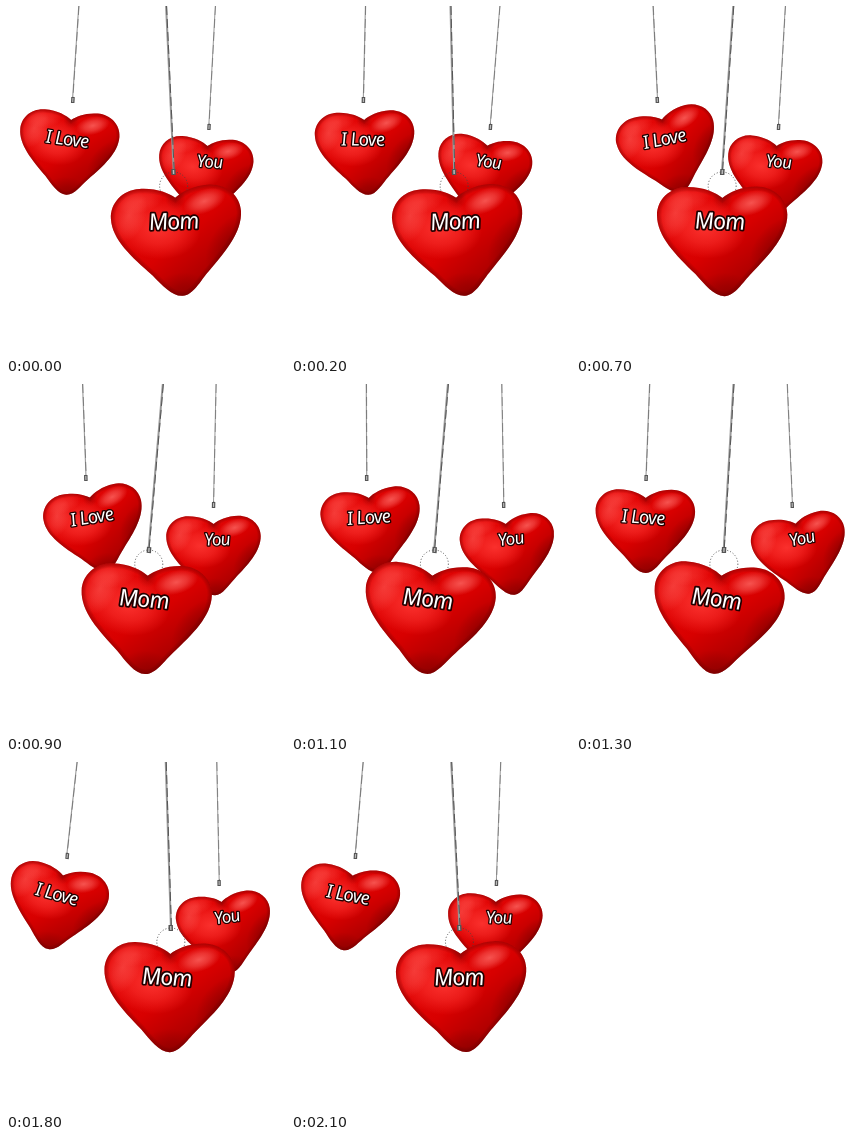
Write an HTML page with a canvas that moves like this. It is 279 px wide and 350 px high and loops after 2.2 s.

```html
<!DOCTYPE html>
<html lang="en">
<head>
<meta charset="utf-8">
<title>I Love You Mom</title>
<style>
html, body { margin: 0; width: 100%; height: 100%; overflow: hidden; background: #fff; }
canvas { display: block; }
</style>
</head>
<body>
<canvas id="stage" width="279" height="350"></canvas>
<script>
const ctx = document.getElementById('stage').getContext('2d');
const LOOP = 2200, STEP = 100;

// Each value that swings is [mean, amplitude, time of its peak].
const hearts = [
  { text: 'I Love', size: 18.4, scale: 1, y: 95, wire: 1.1,
    top: [74, 3, 700], end: [71.2, 10.2, 710], tilt: [0.9, 13, 705], tx: -2.5, ty: 38, turn: 3 },
  { text: 'You', size: 18, scale: 0.95, y: 122, wire: 1,
    top: [210, 1.3, 1450], end: [207.8, 9.5, 1460], tilt: [1, 11, 1470], tx: 3.5, ty: 35, turn: 0 },
  { text: 'Mom', size: 17.6, scale: 1.31, y: 167, wire: 2, ring: true,
    top: [158.5, 1.7, 2070], end: [155.5, 13, 2070], tilt: [-0.4, 4.9, 210], tx: -2.5, ty: 36.5, turn: 2 }
];

const body = new Path2D(
  'M0 19C5 15 14 10.5 26 10.5C39 10.5 49.5 20 49.5 32C49.5 48 36 62 22 76.5' +
  'C15 83.5 9 94 1 94C-7 94 -14 85 -21 77C-36 62 -50 48 -50 32' +
  'C-50 20 -40 10.5 -27 10.5C-14 10.5 -5 15 0 19Z');

const rad = deg => deg * Math.PI / 180;
const swing = ([mean, amp, peak], t) => mean + amp * Math.cos(2 * Math.PI * (t - peak) / LOOP);

// Soft elliptical patch of light or shade
function glow(x, y, rx, ry, angle, rgb, alpha) {
  ctx.save();
  ctx.translate(x, y);
  ctx.rotate(rad(angle));
  ctx.scale(rx, ry);
  const g = ctx.createRadialGradient(0, 0, 0, 0, 0, 1);
  g.addColorStop(0, `rgba(${rgb},${alpha})`);
  g.addColorStop(0.5, `rgba(${rgb},${alpha * 0.6})`);
  g.addColorStop(1, `rgba(${rgb},0)`);
  ctx.fillStyle = g;
  ctx.fillRect(-1, -1, 2, 2);
  ctx.restore();
}

function drawBody() {
  ctx.save();
  ctx.clip(body);
  const base = ctx.createLinearGradient(-22, 14, 30, 84);
  base.addColorStop(0, '#e60808');
  base.addColorStop(0.5, '#d80000');
  base.addColorStop(1, '#a00000');
  ctx.fillStyle = base;
  ctx.fillRect(-52, 5, 104, 92);
  glow(46, 60, 30, 22, -48, '90,0,0', 0.45);
  glow(1, 96, 24, 20, 0, '90,0,0', 0.35);
  glow(0, 19, 8, 9, 0, '120,0,0', 0.4);
  glow(-14, 42, 32, 23, 8, '255,56,52', 0.85);
  glow(-36, 30, 13, 21, 22, '255,95,90', 0.55);
  glow(-27, 20, 18, 9, -10, '255,80,75', 0.5);
  glow(22, 23, 17, 9, -18, '255,110,105', 0.75);
  ctx.strokeStyle = 'rgba(90,0,0,0.1)';
  for (let w = 1.5; w <= 8; w += 1.7) {
    ctx.lineWidth = w;
    ctx.stroke(body);
  }
  ctx.restore();
}

function drawText(h) {
  ctx.save();
  ctx.translate(h.tx, h.ty);
  ctx.rotate(rad(h.turn));
  // Eases the italic slant
  ctx.transform(1, 0, 0.13, 1, 0, 0);
  ctx.font = `italic 500 ${h.size}px "Noto Sans", "Open Sans", sans-serif`;
  ctx.letterSpacing = '-0.7px';
  ctx.textAlign = 'center';
  ctx.lineJoin = 'round';
  ctx.lineWidth = 2.6;
  ctx.strokeStyle = '#210000';
  ctx.strokeText(h.text, 0, h.size * 0.36);
  ctx.fillStyle = '#fff';
  ctx.fillText(h.text, 0, h.size * 0.36);
  ctx.restore();
}

function line(x1, y1, x2, y2, width, color, dash = []) {
  ctx.beginPath();
  ctx.moveTo(x1, y1);
  ctx.lineTo(x2, y2);
  ctx.lineWidth = width;
  ctx.strokeStyle = color;
  ctx.setLineDash(dash);
  ctx.stroke();
  ctx.setLineDash([]);
}

function drawWire(h, top, end) {
  const bottom = h.y - 4, w = h.wire;
  line(top, 0, end, bottom, w, '#999');
  line(top + w / 4, 0, end + w / 4, bottom, w / 2, '#555', [9, 4]);
  const slope = (end - top) / h.y;
  const cap = w + 2.4;
  line(end - slope * 5, h.y - 4, end, h.y + 2, cap, '#555');
  line(end - slope * 4, h.y - 3, end, h.y + 1, cap / 3, '#bbb');
}

function drawRing(x, y) {
  ctx.beginPath();
  ctx.arc(x, y, 14, 0, 2 * Math.PI);
  ctx.lineWidth = 0.9;
  ctx.strokeStyle = '#444';
  ctx.setLineDash([1, 2]);
  ctx.stroke();
  ctx.setLineDash([]);
}

function drawHeart(h, t) {
  const top = swing(h.top, t), end = swing(h.end, t);
  if (h.ring) drawRing(end, h.y + 13);
  ctx.save();
  ctx.translate(end, h.y);
  ctx.rotate(-rad(swing(h.tilt, t)));
  ctx.scale(h.scale, h.scale);
  drawBody();
  drawText(h);
  ctx.restore();
  drawWire(h, top, end);
}

function draw(t) {
  ctx.fillStyle = '#fff';
  ctx.fillRect(0, 0, 279, 350);
  for (const h of hearts) drawHeart(h, t);
}

const start = performance.now();
function tick() {
  const t = (performance.now() - start) % LOOP;
  draw(Math.floor(t / STEP) * STEP);
  requestAnimationFrame(tick);
}
tick();
</script>
</body>
</html>
```
